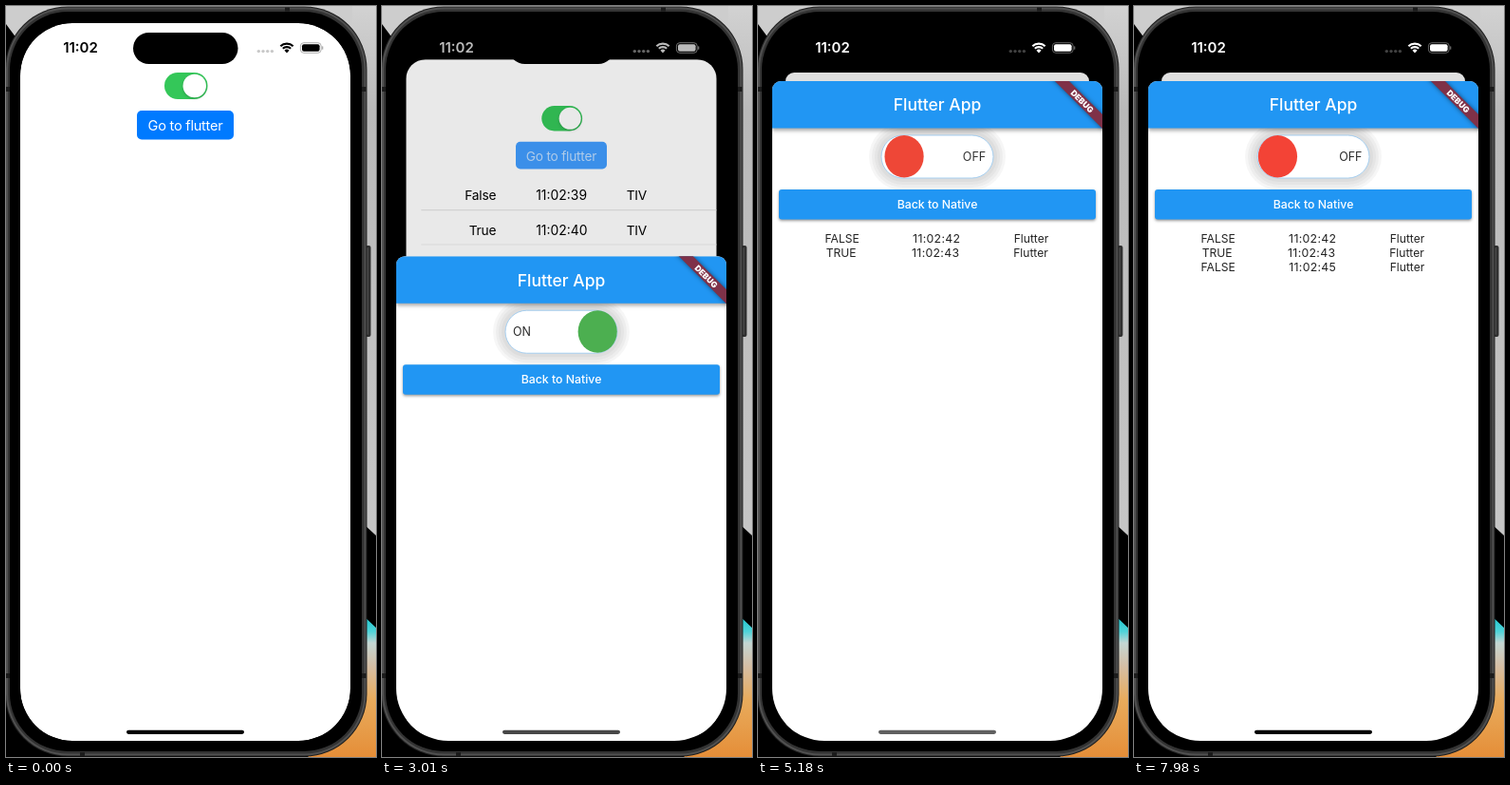
These frames come from a looping animation (390x790 px, 8 s). An HTML page with a canvas:

```html
<!DOCTYPE html>
<html lang="en">
<head>
<meta charset="utf-8">
<title>Native and Flutter switch</title>
<style>
  html, body { margin: 0; width: 100%; height: 100%; overflow: hidden; background: #000; }
  canvas { display: block; width: 390px; height: 790px; }
</style>
</head>
<body>
<canvas id="stage"></canvas>
<script>
const W = 390, H = 790, LOOP = 8000, STEP = 70;
const SCREEN = { x: 15, y: 18, w: 348, h: 755, r: 55 };
const SHEET_TOP = 79, SHEET_START = 2865;
const FONT = 'Inter, Roboto, sans-serif';

const canvas = document.getElementById('stage');
const ctx = canvas.getContext('2d');
const dpr = window.devicePixelRatio || 1;
canvas.width = W * dpr;
canvas.height = H * dpr;

const clamp = x => Math.max(0, Math.min(1, x));
const lerp = (a, b, p) => a + (b - a) * p;
const span = (t, from, to) => clamp((t - from) / (to - from));
const smooth = p => p * p * (3 - 2 * p);
const easeOut = (p, n) => 1 - Math.pow(1 - p, n);
const mix = (a, b, p) => `rgb(${a.map((v, i) => Math.round(lerp(v, b[i], p))).join(',')})`;
const gray = v => `rgb(${v},${v},${v})`;

function settle(t) {
  const k = Math.max(0, t) * 0.018;
  return 1 - (1 + k) * Math.exp(-k);
}

function box(x, y, w, h, r, fill) {
  ctx.beginPath();
  ctx.roundRect(x, y, w, h, r);
  if (fill) {
    ctx.fillStyle = fill;
    ctx.fill();
  }
}

function poly(points, fill) {
  ctx.beginPath();
  points.forEach(([x, y]) => ctx.lineTo(x, y));
  ctx.fillStyle = fill;
  ctx.fill();
}

function gradient(y0, y1, stops) {
  const g = ctx.createLinearGradient(0, y0, 0, y1);
  stops.forEach(([p, c]) => g.addColorStop(p, c));
  return g;
}

function shadow(color, blur, dy) {
  ctx.shadowColor = color;
  ctx.shadowBlur = blur * dpr;
  ctx.shadowOffsetY = dy * dpr;
}

function text(s, x, y, size, { color = '#000', weight = 400, align = 'center', gap = 0 } = {}) {
  ctx.font = `${weight} ${size}px ${FONT}`;
  ctx.letterSpacing = gap + 'px';
  ctx.textAlign = align;
  ctx.fillStyle = color;
  ctx.fillText(s, x, y);
}

function scoped(draw) {
  ctx.save();
  draw();
  ctx.restore();
}

function drawWallpaper() {
  ctx.fillStyle = '#000';
  ctx.fillRect(0, 0, W, H);
  ctx.fillStyle = '#cdcdcd';
  ctx.fillRect(0, 0, W, 60);
  poly([[0, 19], [20, 46], [20, 90], [0, 90]], '#000');
  poly([[365, 0], [390, 0], [390, 557], [365, 534]],
    gradient(0, 557, [[0, '#d2d2d2'], [0.2, '#b9b9b9'], [1, '#c6c6c6']]));
  poly([[370, 635], [390, 654], [390, 790], [318, 790], [370, 740]],
    gradient(640, 790, [[0, '#16c3cc'], [0.12, '#4fd3d8'], [0.2, '#c4d6d3'],
      [0.36, '#d5bfa6'], [0.6, '#e8ab5c'], [1, '#e58e38']]));
}

function drawPhone() {
  box(379, 252, 5.5, 96, 2, '#2f2f2f');
  box(380, 254, 2, 92, 1, '#4b4b4b');
  box(-1, 0.5, 381.5, 789, 66, '#1d1d1d');
  box(0, 1.5, 379.5, 787, 65, '#505050');
  box(2, 3.5, 375.5, 783, 63, '#333');
  ctx.fillStyle = '#1b1b1b';
  for (const y of [85, 702]) {
    ctx.fillRect(0, y, 4, 5);
    ctx.fillRect(375, y, 4.5, 5);
  }
  ctx.fillRect(294, 1.5, 5, 4);
  ctx.fillRect(78, 785, 5, 4);
  box(4, 6, 371, 778, 61, '#000');
}

function drawNativeSwitch(t) {
  const on = t < 1750
    ? 1 - easeOut(span(t, 930, 1300), 3)
    : easeOut(span(t, 1880, 2300), 3);
  const tint = t < 1750
    ? 1 - easeOut(span(t, 920, 1400), 2)
    : easeOut(span(t, 1850, 2520), 2);
  const press = t < 1750 ? 0 : Math.sin(Math.PI * span(t, 1700, 2200));
  const w = 24.5 + 4 * press;
  const left = lerp(168.5, 211 - w, on);
  box(167, 70, 45.5, 28, 14, mix([233, 233, 235], [52, 199, 89], tint));
  scoped(() => {
    shadow('rgba(0,0,0,.22)', 3, 1.2);
    box(left, 71.8, w, 24.4, 12.2, '#fff');
  });
}

function nativeRow(state, time, y, line) {
  const style = { align: 'left', gap: -0.2 };
  text(state, 116, y, 14.6, { align: 'right', gap: -0.2 });
  text(time, 160.5, y, 14.8, { align: 'left' });
  text('TIV', 262, y, 14.6, style);
  ctx.fillStyle = line;
  ctx.fillRect(32, y + 10.5, 331, 1);
}

function drawNative(t) {
  ctx.fillStyle = '#fff';
  ctx.fillRect(SCREEN.x, SCREEN.y, SCREEN.w, SCREEN.h);
  drawNativeSwitch(t);
  const held = t >= 2800;
  box(138, 110, 102, 30.5, 5, held ? '#409cff' : '#007aff');
  text('Go to flutter', 189, 131, 14.6,
    { color: held ? '#bfdeff' : '#fff', gap: -0.25 });
  if (t >= 980) nativeRow('False', '11:02:39', 175.5, '#dedede');
  if (t >= 1890) nativeRow('True', '11:02:40', 214, '#ebebeb');
}

function drawCard(t, p) {
  const x = lerp(SCREEN.x, 29, p), y = lerp(SCREEN.y, 70, p);
  const k = (378 - 2 * x) / SCREEN.w;
  ctx.translate(x, y);
  ctx.scale(k, k);
  ctx.translate(-SCREEN.x, -SCREEN.y);
  box(SCREEN.x, SCREEN.y, SCREEN.w, SCREEN.h, lerp(SCREEN.r, 10, p));
  ctx.clip();
  drawNative(t);
  ctx.fillStyle = `rgba(0,0,0,${0.12 * p})`;
  ctx.fillRect(0, 0, W, H);
}

function rollValue(t) {
  const turn = start => smooth(span(t, start, start + 600));
  return 1 - turn(4050) + turn(5110) - turn(7400);
}

function drawRollSwitch(v) {
  for (const e of [13, 10, 7, 4]) {
    box(130 - e, 136 - e, 118 + 2 * e, 45 + 2 * e, 22.5 + e, 'rgba(0,0,0,.035)');
  }
  box(130, 136, 118, 45, 22.5, '#fff');
  ctx.strokeStyle = '#9ecbf0';
  ctx.lineWidth = 0.9;
  ctx.stroke();
  scoped(() => {
    ctx.globalAlpha = clamp(v);
    text('ON', 138 + 9 * (1 - v), 162.6, 12.5, { color: '#2b2b2b', align: 'left' });
    ctx.globalAlpha = clamp(1 - v);
    text('OFF', 240.5 - 9 * v, 162.6, 12.5, { color: '#2b2b2b', align: 'right' });
  });
  ctx.beginPath();
  ctx.ellipse(lerp(151.2, 227.2, v), 158.3, 20.6, 22.2, 0, 0, 7);
  ctx.fillStyle = mix([244, 67, 54], [76, 175, 80], v);
  ctx.fill();
}

function drawRibbon() {
  ctx.translate(363, SHEET_TOP);
  ctx.rotate(Math.PI / 4);
  shadow('rgba(0,0,0,.5)', 5, 0);
  ctx.fillStyle = '#7f3148';
  ctx.fillRect(-40, 24.8, 80, 10.6);
  shadow('transparent', 0, 0);
  text('DEBUG', 0, 33.2, 8.6, { color: '#fff', weight: 900 });
}

function flutterRow(state, time, y, dx) {
  const style = { color: '#222' };
  text(state, 88.7 + dx, y, 12.1, style);
  text(time, 188.2 + dx, y, 12.3, { color: '#222', gap: 0.3 });
  text('Flutter', 288 + dx / 2, y, 12.1, style);
}

function drawSheet(t, p) {
  ctx.translate(0, (SCREEN.y + SCREEN.h - SHEET_TOP) * (1 - p));
  box(SCREEN.x, SHEET_TOP, SCREEN.w, 720, [9, 9, 0, 0], '#fff');
  ctx.clip();
  drawRollSwitch(rollValue(t));

  scoped(() => {
    shadow('rgba(0,0,0,.35)', 4, 2);
    box(SCREEN.x, SHEET_TOP, SCREEN.w, 49.5, 0, '#2196f3');
  });
  text('Flutter App', 189, 110.3, 17.5, { color: '#fff', weight: 500 });
  scoped(drawRibbon);

  scoped(() => {
    shadow('rgba(0,0,0,.4)', 3, 1.5);
    box(22, 193, 334, 31.5, 3, '#2196f3');
  });
  text('Back to Native', 189, 213, 12.3, { color: '#fff', weight: 500 });

  if (t >= 4130) flutterRow('FALSE', '11:02:42', 248.5, 0);
  if (t >= 5180) flutterRow('TRUE', '11:02:43', 263.5, -1);
  if (t >= 7490) flutterRow('FALSE', '11:02:45', 278.6, 0);
}

function drawStatus(t, p) {
  const ink = gray(Math.round(255 * p));
  box(134, 28, 110.5, 33, 16.5, '#000');
  text('11:02', 78.5, 49.3, 15, { color: ink, weight: 600 });

  for (let i = 0; i < 4; i++) {
    ctx.beginPath();
    ctx.arc(266.3 + i * 4.7, 47.6, 1.7, 0, 7);
    ctx.fillStyle = gray(Math.round(lerp(200, 66, p)));
    ctx.fill();
  }

  ctx.strokeStyle = ink;
  ctx.lineWidth = 2.1;
  for (const r of [9.4, 5.9]) {
    ctx.beginPath();
    ctx.arc(296, 49, r, -Math.PI * 0.75, -Math.PI * 0.25);
    ctx.stroke();
  }
  ctx.beginPath();
  ctx.moveTo(296, 49.4);
  ctx.arc(296, 49.4, 3.6, -Math.PI * 0.75, -Math.PI * 0.25);
  ctx.fillStyle = ink;
  ctx.fill();

  const rim = gray(Math.round(lerp(165, 110, p)));
  box(310.4, 38.7, 21.8, 10.6, 3.4);
  ctx.strokeStyle = rim;
  ctx.lineWidth = 0.9;
  ctx.stroke();
  box(312, 40.3, 18.6, 7.4, 2, ink);
  box(333.1, 42.2, 1.2, 3.6, 0.6, rim);

  const bar = 96 * p * (1 - span(t, 7490, 7910));
  box(127, 761.7, 124, 4.3, 2.15, gray(Math.round(bar)));
}

function draw(t) {
  const p = settle(t - SHEET_START);
  ctx.setTransform(dpr, 0, 0, dpr, 0, 0);
  drawWallpaper();
  drawPhone();
  scoped(() => {
    box(SCREEN.x, SCREEN.y, SCREEN.w, SCREEN.h, SCREEN.r);
    ctx.clip();
    scoped(() => drawCard(t, p));
    if (p > 0) scoped(() => drawSheet(t, p));
    drawStatus(t, p);
  });
}

const begin = performance.now();
function tick() {
  const t = (performance.now() - begin) % LOOP;
  draw(Math.floor(t / STEP) * STEP);
  requestAnimationFrame(tick);
}
tick();
</script>
</body>
</html>
```
